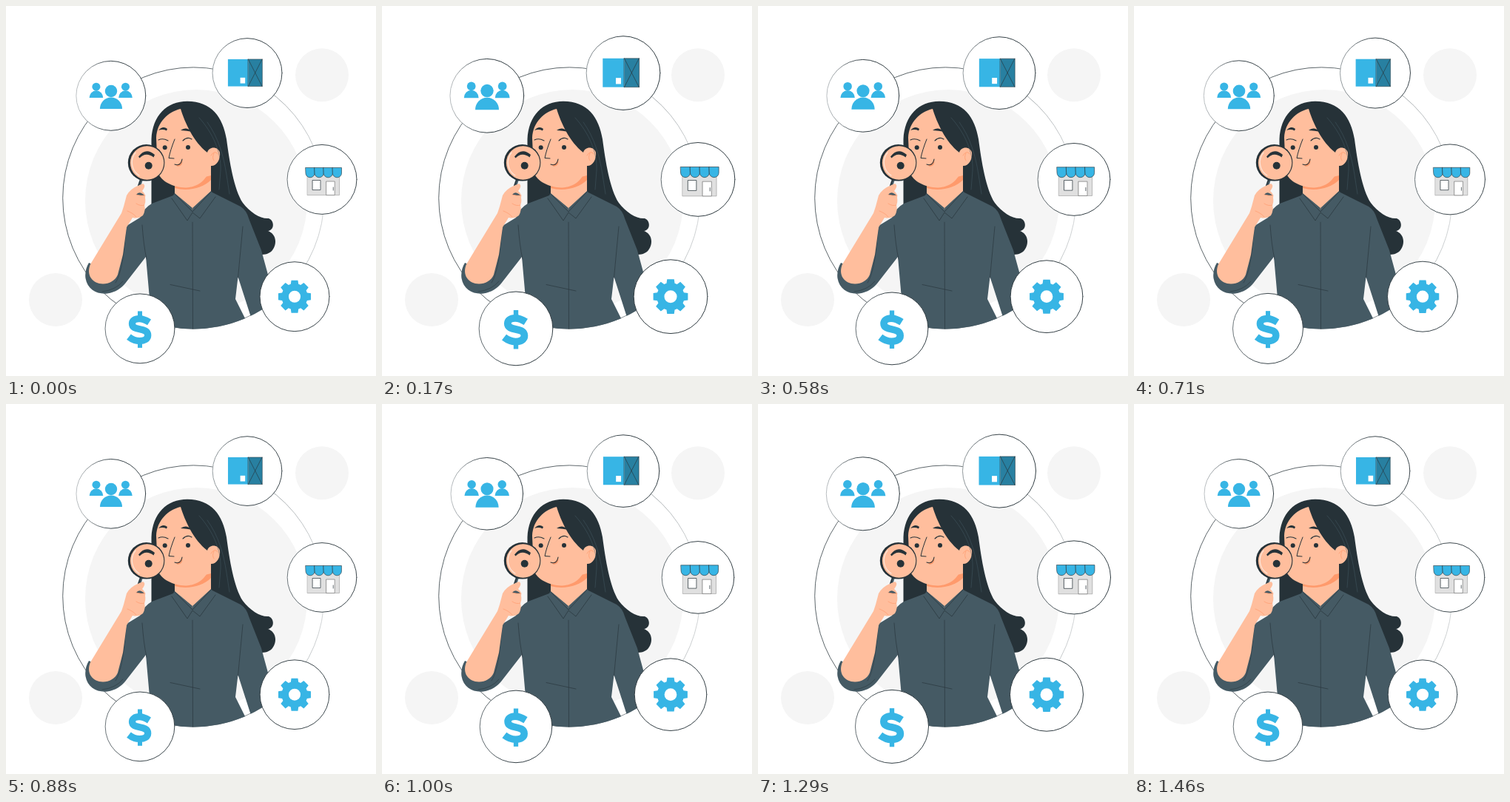
Animation, 500 px wide and 500 px high, one loop 1.5 s. Source, as an HTML page with a canvas:

```html
<!DOCTYPE html>
<html lang="en">
<head>
<meta charset="utf-8">
<style>
html, body { margin: 0; width: 100%; height: 100%; overflow: hidden; background: #fff; }
canvas { display: block; width: 500px; height: 500px; }
</style>
</head>
<body>
<canvas id="stage" width="500" height="500"></canvas>
<script>
const canvas = document.getElementById('stage');
const ctx = canvas.getContext('2d');
const DARK = '#263238', SHIRT = '#455a64', SKIN = '#ffbe9d', SHADE = '#ff9a6c';
const BLUE = '#37b5e5', PALE = '#f5f5f5', RING = { x: 253.3, y: 259.5, r: 177 };

function fill(d, color) {
  ctx.fillStyle = color;
  ctx.fill(new Path2D(d));
}

function line(d, width = 0.6, color = DARK) {
  ctx.lineWidth = width;
  ctx.strokeStyle = color;
  ctx.stroke(new Path2D(d));
}

function circle(x, y, r, color, stroke, width = 0.9) {
  ctx.beginPath();
  ctx.arc(x, y, r, 0, Math.PI * 2);
  if (color) { ctx.fillStyle = color; ctx.fill(); }
  if (stroke) { ctx.strokeStyle = stroke; ctx.lineWidth = width; ctx.stroke(); }
}

function box(x, y, w, h, color, stroke, width = 0.7) {
  ctx.fillStyle = color;
  ctx.fillRect(x, y, w, h);
  if (stroke) { ctx.strokeStyle = stroke; ctx.lineWidth = width; ctx.strokeRect(x, y, w, h); }
}

function fade(x, r, left, right) {
  const g = ctx.createLinearGradient(x - r, 0, x + r, 0);
  g.addColorStop(0, left);
  g.addColorStop(0.5, DARK);
  g.addColorStop(1, right);
  return g;
}

function drawBackdrop() {
  circle(67, 397, 36, PALE);
  circle(427, 93.3, 36, PALE);
  circle(257, 263, 150, PALE);
  circle(RING.x, RING.y, RING.r - 0.4, null, fade(RING.x, RING.r, DARK, '#c4c8ca'), 0.75);
}

function drawHair() {
  fill('M196.5 268V180C198 148 217 128.7 245 128.7C278 129 293 150 298 180C302 210 308 248 320 266C330 279 344 288 355 287C363 290 363 303 354 304C365 308 367 321 360 330C356 335 350 336 344 336L300 300Z', DARK);
}

function drawShirt() {
  // Only the hem follows the ring; the elbow may cross it.
  ctx.save();
  ctx.beginPath();
  ctx.rect(0, 0, 500, 390);
  ctx.arc(RING.x, RING.y, RING.r, 0, Math.PI * 2);
  ctx.clip();
  fill('M226 256L197 267Q186 273 181 286L163 297L155 345L150 364L112 347Q106 357 107.5 368C110 383 123 390 137 388.5C148 387 156 381 161 375L189 339L198 440H332L310 396L313.5 366L336 436H372L357 374L345 330L328 287Q325 276 317 271L277 251Z', SHIRT);
  line('M184 296Q186 324 190 342M320 298L313.5 367M252 279L252.5 437M222 376.5L262 385');
  line('M162 300C160 330 157 360 148 374M130 386Q148 384 158 372', 0.5);
  ctx.restore();
}

function drawHead() {
  fill('M228 236V256L252 276L277 252V210Z', SKIN);
  fill('M228 241L277 229V235C266 246 246 251 228 246Z', SHADE);
  fill('M203 178C204 157 219 143 236 139C242 158 253 183 272 198C274 190 286 189 289 198C290 207 285 217 276 216C273 235 259 245 243 245.5C225 245 210 237 205 225Z', SKIN);
  line('M277 202Q282 194 286 200M281 199Q278 205 281 209', 0.7, SHADE);
  line('M261 151C280 172 291 198 290 222L288 248M272 157C287 178 294 202 298 228L302 254', 0.5, SHIRT);
  fill('M206 168Q212 161 218 166L217 168.5Q212 166 206 168ZM236 168Q243 162 252 170Q244 168.5 236 168Z', DARK);
  line('M206 181Q212 178 219 182M239 182Q245 176 251 180', 1.1);
  circle(214.7, 191.2, 3, DARK);
  circle(246, 191, 3, DARK);
  line('M228 180Q222 195 220 205.5L227 206', 1);
  fill('M229 214.5Q236 214 238 207Q240 216 232 217Z', SHADE);
  line('M228 214Q236 217 238 207', 1.1);
}

function drawCollar() {
  fill('M228 253L223 260L245 291L252 273ZM277 250L283 258L262 288L252 273Z', SHIRT);
  fill('M245 290L252 273L262 288L252 292Z', SHIRT);
  line('M228 254L252 278L277 251M224 260L245 290L252 279L262 287L283 258', 0.65);
}

function drawMagnifier() {
  line('M183 234L177 252', 4, SHIRT);
  line('M182 235L176 251', 1.2);
  circle(189.6, 211.8, 24.8, DARK);
  circle(190.6, 212, 22.7, SKIN);
  line('M175 198A21 21 0 0 0 180 229', 1.2, '#ffe5d9');
  circle(192.7, 215.8, 5, DARK);
  fill('M179 203.5Q189 190.5 201 201L199.5 204.5Q189 196.5 180.5 205.5Z', DARK);
}

function drawArm() {
  fill('M159 271L163 256Q168 247 178 243L185 240Q189 242 186 247L184 250Q189 254 188 259Q189 265 187 269Q189 276 185 283Q179 288 171 286L163 299L158 336L151 363C147 373 136 377 126 375C114 372 109 361 114 349L156 280Z', SKIN);
  fill('M176 255Q180 249 187 256L183 256Z', SHIRT);
  line('M176 255Q181 257 188 256M176 267Q182 271 187 269M164 277Q172 280 176 285', 0.65, SHADE);
}

function drawPeople() {
  for (const [x, y, r, half, height, base] of [
    [122, 109.2, 5.5, 9.3, 9.7, 124],
    [161.4, 109.2, 5.5, 9.3, 9.7, 124],
    [142, 115, 8.2, 15, 15.5, 139]
  ]) {
    circle(x, y, r, BLUE);
    fill(`M${x - half} ${base}a${half} ${height} 0 0 1 ${2 * half} 0Z`, BLUE);
  }
}

function drawCrate() {
  box(300, 72, 27.3, 36.5, BLUE);
  box(327.3, 72, 19, 36.5, '#2880a1', DARK, 0.5);
  line('M327.3 72L346 108.5M346 72L327.3 108.5');
  box(316.6, 96.8, 6.6, 7.7, '#fff');
}

function drawShop() {
  box(407.5, 228, 43, 27.5, '#e0e0e0', '#999', 0.6);
  box(414.5, 235.5, 10.5, 13, '#fff', DARK);
  box(433, 237, 11.2, 18.5, '#fff', '#777');
  line('M442.2 245V249', 0.7);
  for (let i = 0; i < 4; i++) {
    const x = 405 + i * 12.1;
    const lobe = `M${x} 218.5h12.1v7.5a6.05 5.8 0 0 1 -12.1 0Z`;
    fill(lobe, BLUE);
    line(lobe);
  }
}

function drawGear() {
  const cx = 390, cy = 392.7;
  ctx.beginPath();
  for (let i = 0; i < 8; i++) {
    for (const [turn, r] of [[-0.3, 17.6], [-0.2, 22.4], [0.2, 22.4], [0.3, 17.6]]) {
      const a = i * Math.PI / 4 + turn;
      ctx.lineTo(cx + r * Math.cos(a), cy + r * Math.sin(a));
    }
  }
  ctx.closePath();
  ctx.fillStyle = BLUE;
  ctx.fill();
  circle(cx, cy, 8, '#fff');
}

function drawDollar() {
  ctx.lineCap = 'butt';
  line('M193.5 427.5C188 424 184 422.7 180 422.7C174 422.7 170.5 425.5 170.5 429.5C170.5 440 191.7 433.5 191.7 445C191.7 450 187 452.5 180.5 452.5C175 452.5 170.5 450.5 166 447', 9.2, BLUE);
  box(178, 412.5, 6, 9, BLUE);
  box(178, 453, 6, 8.8, BLUE);
  ctx.lineCap = 'round';
}

const badges = [
  { x: 141.8, y: 121.3, icon: drawPeople, left: '#b5babd' },
  { x: 326, y: 90.6, icon: drawCrate, left: '#8b9397' },
  { x: 427, y: 234.4, icon: drawShop, left: '#5c666b' },
  { x: 390, y: 392.7, icon: drawGear, left: DARK },
  { x: 181, y: 435.9, icon: drawDollar, left: '#5c666b' }
];

function drawBadge({ x, y, icon, left }, scale) {
  ctx.save();
  ctx.translate(x, y);
  ctx.scale(scale, scale);
  ctx.translate(-x, -y);
  circle(x, y, 46.8, '#fff', fade(x, 46.8, left, DARK));
  icon();
  ctx.restore();
}

// Two uneven beats per loop, measured in 24 fps steps: [step, swell].
const beats = [[-1, 0], [7, 1], [20.5, 0], [28, 1], [35, 0], [43, 1]];

function swell(step) {
  const i = beats.findIndex(([end]) => step < end);
  const [t0, v0] = beats[i - 1], [t1, v1] = beats[i];
  const eased = (1 - Math.cos(Math.PI * (step - t0) / (t1 - t0))) / 2;
  return v0 + (v1 - v0) * eased;
}

function draw(now) {
  const step = Math.floor(((now % 1500) + 5) * 24 / 1000) % 36;
  ctx.clearRect(0, 0, 500, 500);
  ctx.lineCap = ctx.lineJoin = 'round';
  drawBackdrop();
  drawHair();
  drawShirt();
  drawHead();
  drawCollar();
  drawMagnifier();
  drawArm();
  const scale = 1 + 0.095 * swell(step);
  for (const badge of badges) drawBadge(badge, scale);
}

let start;
function tick(now) {
  start ??= now;
  draw(now - start);
  requestAnimationFrame(tick);
}
draw(0);
requestAnimationFrame(tick);
</script>
</body>
</html>
```
